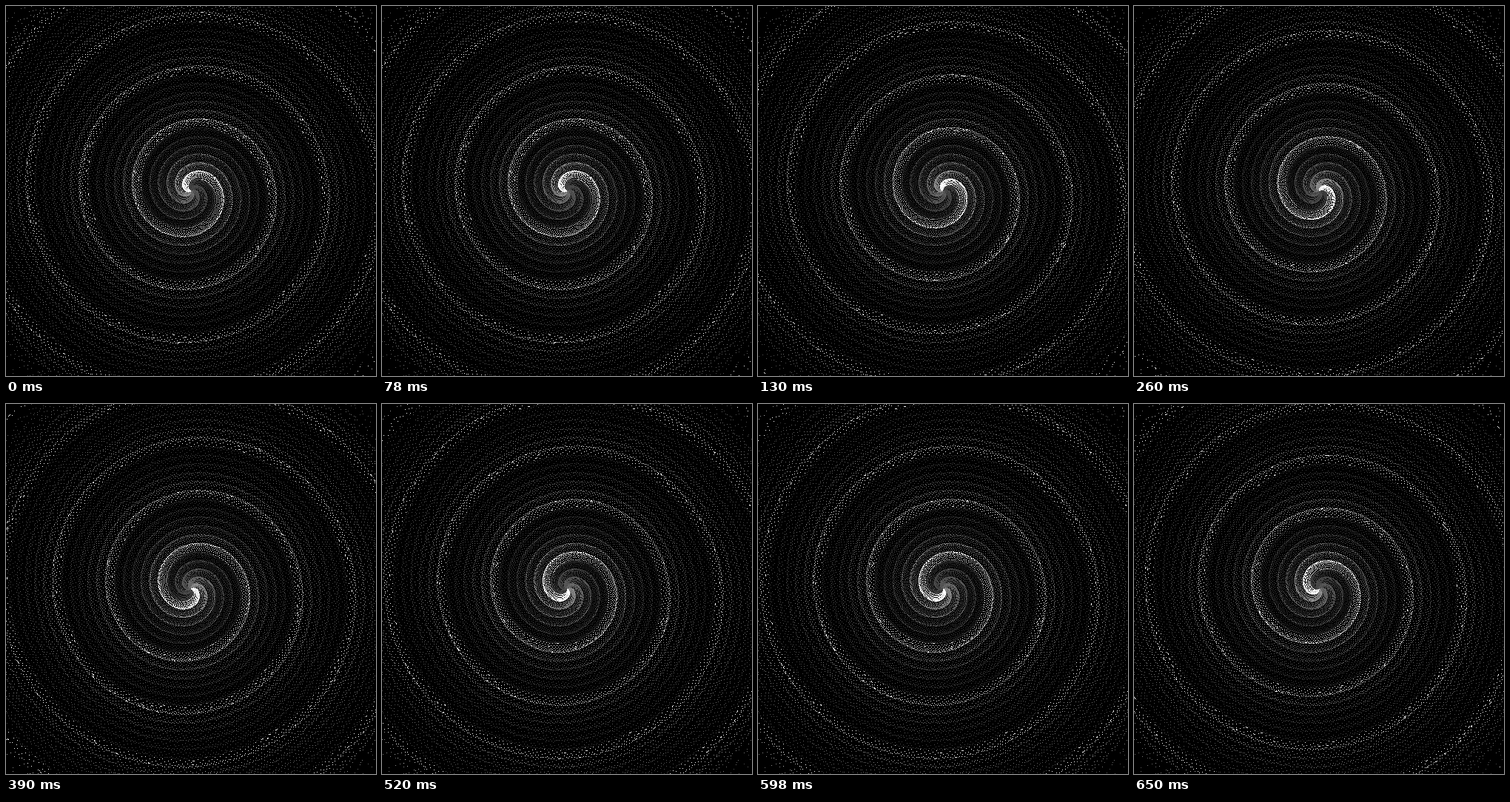
Recreate the animation shown at these times as an HTML page with a canvas. Size 500 by 500 pixels, loop 780 ms.

```html
<!DOCTYPE html>
<html lang="en">
<head>
<meta charset="utf-8">
<title>Spiral of dots</title>
<style>
  html, body { margin: 0; width: 100%; height: 100%; overflow: hidden; background: #000; }
  canvas { display: block; width: 500px; height: 500px; }
</style>
</head>
<body>
<canvas id="stage" width="500" height="500"></canvas>
<script>
const SIZE = 500, MID = 250, TAU = Math.PI * 2;
const ARMS = 6, GAP = 12, START = 25, STEP = 130;
const DOTS = 31000, REACH = 350;
const GOLDEN = Math.PI * (3 - Math.sqrt(5));
const LEVELS = [238, 122, 92, 76, 64, 56]; // brightness by time since an arm was lit

const ctx = document.getElementById('stage').getContext('2d');

function seeded(seed) {
  return () => {
    seed = (seed + 0x6D2B79F5) | 0;
    let t = Math.imul(seed ^ (seed >>> 15), 1 | seed);
    t = (t + Math.imul(t ^ (t >>> 7), 61 | t)) ^ t;
    return ((t ^ (t >>> 14)) >>> 0) / 4294967296;
  };
}

// Dots gather at the outer edge of each of six interleaved spiral bands.
function makeDots() {
  const rand = seeded(71), dots = [];
  for (let i = 0; i < DOTS; i++) {
    const base = REACH * i / DOTS;
    const turn = (i * GOLDEN) % TAU; // clockwise from the top
    const shift = START + ARMS * GAP * turn / TAU;
    const s = (base - shift) / GAP;
    const arm = Math.floor(s) + 1;
    const inside = arm - s;
    const jitter = (rand() - 0.5) * base * 0.008;
    const r = shift + GAP * (arm - inside * inside) + jitter;
    const gain = 0.75 + rand() * 0.5 + base / 800;
    const streak = base > 70 && rand() < 0.05 ? 3 : 1;
    const fade = Math.min(1, (REACH - base) / 50);
    if (r < 0 || rand() > fade) continue;
    dots.push({ r, turn, arm, gain, streak });
  }
  return dots;
}

function render(dots, step) {
  const image = ctx.createImageData(SIZE, SIZE);
  const px = image.data;
  for (let i = 3; i < px.length; i += 4) px[i] = 255;
  for (const d of dots) {
    const age = (((d.arm + step) % ARMS) + ARMS) % ARMS;
    const level = Math.min(255, LEVELS[age] * d.gain);
    const length = age === 0 ? d.streak : 1;
    for (let n = 0; n < length; n++) {
      const a = d.turn + n / Math.max(d.r, 1);
      const x = Math.floor(MID + d.r * Math.sin(a));
      const y = Math.floor(MID - d.r * Math.cos(a));
      if (x < 0 || y < 0 || x >= SIZE || y >= SIZE) continue;
      const p = (y * SIZE + x) * 4;
      const v = Math.max(px[p], level);
      px[p] = px[p + 1] = px[p + 2] = v;
    }
  }
  return image;
}

const dots = makeDots();
const poses = Array.from({ length: ARMS }, (_, k) => render(dots, k));
const begin = performance.now();
let shown = -1;

function draw(now) {
  const k = Math.floor(Math.max(0, now - begin) / STEP) % ARMS;
  if (k !== shown) ctx.putImageData(poses[k], 0, 0);
  shown = k;
  requestAnimationFrame(draw);
}
draw(begin);
</script>
</body>
</html>
```
